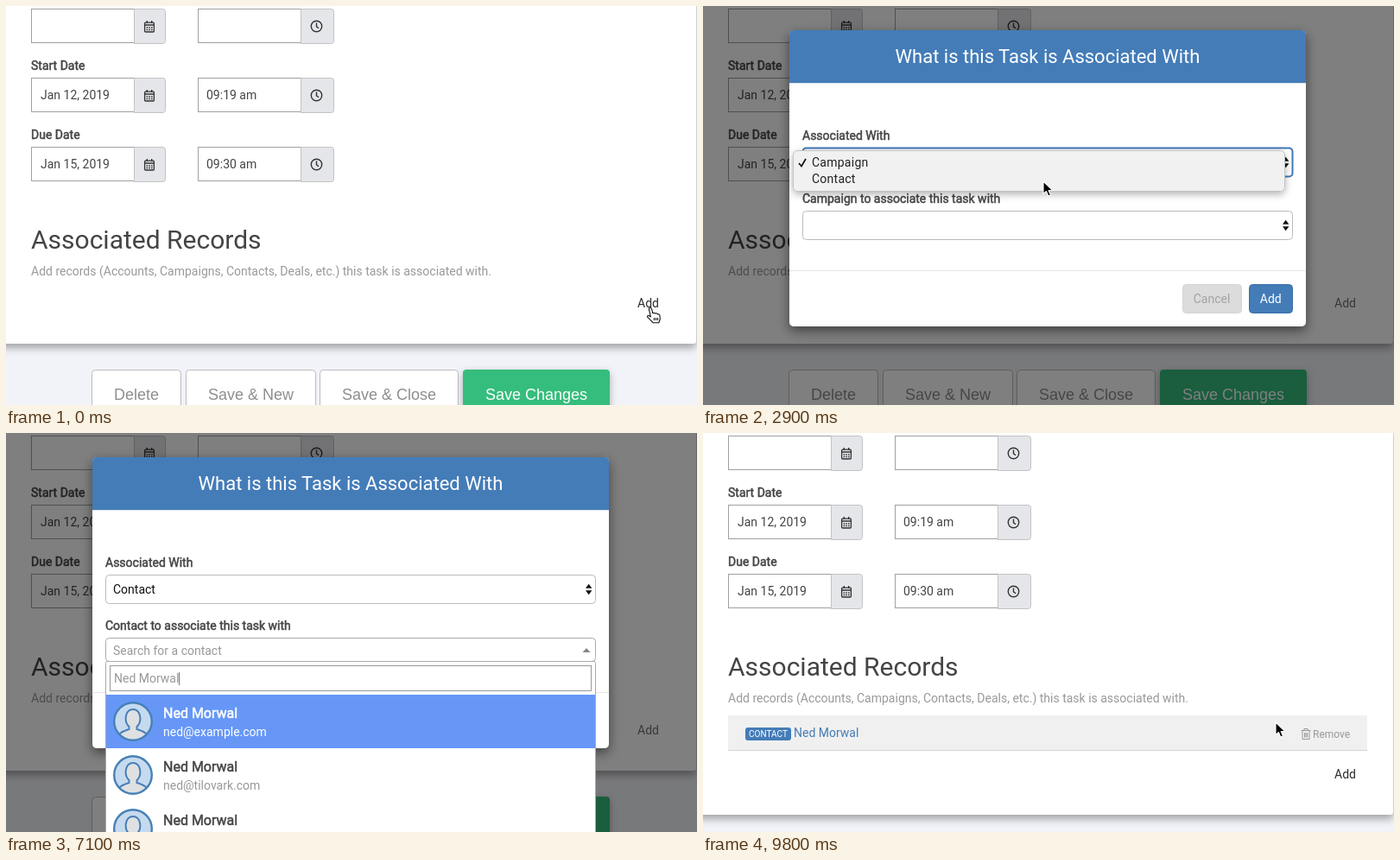
These frames come from a looping animation (800x462 px, 10 s). An HTML page:

```html
<!DOCTYPE html>
<html lang="en">
<head>
<meta charset="utf-8">
<title>Associating a task with a contact</title>
<style>
  html, body { margin: 0; width: 100%; height: 100%; overflow: hidden; background: #f2f3f8; }
  svg { display: block; width: 100%; height: 100%; }
  text { font: 14px Roboto, Arial, sans-serif; fill: #444; white-space: pre; }
  .bold { stroke: #444; stroke-width: .5px; }
  .muted { fill: #999; }
  .light { fill: #fff; }
  .mid { text-anchor: middle; }
  .action { font: 18px "Liberation Sans", Arial, sans-serif; text-anchor: middle; fill: #8e8e8e; }
</style>
</head>
<body>
<svg id="stage" viewBox="0 0 800 462">
  <defs>
    <filter id="panelShadow" x="-5%" y="-5%" width="110%" height="115%">
      <feDropShadow dx="0" dy="5" stdDeviation="5" flood-opacity=".33"/>
    </filter>
    <filter id="modalShadow" x="-10%" y="-10%" width="120%" height="125%">
      <feDropShadow dx="0" dy="5" stdDeviation="7" flood-opacity=".5"/>
    </filter>
    <filter id="softShadow" x="-10%" y="-30%" width="120%" height="170%">
      <feDropShadow dx="0" dy="3" stdDeviation="4" flood-opacity=".3"/>
    </filter>
    <clipPath id="face"><circle r="21.5"/></clipPath>
  </defs>
</svg>
<script>
const LOOP = 10000, STEP = 100;
const PERSON = "Ned Morwal";
const MAILS = ["ned@example.com", "ned@tilovark.com", "ned@example.com"];
const BLUE = "#447cb8";
const stage = document.getElementById("stage");

function el(parent, tag, attrs, content) {
  const node = document.createElementNS("http://www.w3.org/2000/svg", tag);
  for (const key in attrs) node.setAttribute(key, attrs[key]);
  if (content !== undefined) node.textContent = content;
  parent.appendChild(node);
  return node;
}
const group = (parent, attrs = {}) => el(parent, "g", attrs);
const path = (parent, d, attrs) => el(parent, "path", { d, ...attrs });
const label = (parent, x, y, content, cls = "", attrs = {}) =>
  el(parent, "text", { x, y, class: cls, ...attrs }, content);
const rect = (parent, x, y, width, height, fill, attrs = {}) =>
  el(parent, "rect", { x, y, width, height, fill, ...attrs });
// Crisp one pixel border inside the given box
const box = (parent, x, y, w, h, fill, stroke, rx = 0, attrs = {}) =>
  rect(parent, x + .5, y + .5, w - 1, h - 1, fill, { stroke, rx, ...attrs });
const show = (node, on) => node.setAttribute("visibility", on ? "inherit" : "hidden");
const within = (t, a, b) => t >= a && t < b;
const ramp = (t, start, length) => Math.min(1, Math.max(0, (t - start) / length));
const easeOut = k => 1 - (1 - k) ** 2;
const easeBoth = k => k * k * (3 - 2 * k);

// ---- page ----
const page = group(stage);
rect(page, 0, 0, 800, 462, "#f2f3f8");

const actions = group(page);
function action(x, w, content, green) {
  if (green) rect(actions, x, 421, w, 56, "#36bd7d", { rx: 4, filter: "url(#softShadow)" });
  else box(actions, x, 421, w, 56, "#fff", "#bcbcbc", 4);
  label(actions, x + w / 2, 456, content, "action", green ? { style: "fill:#fff" } : {});
}
action(99, 104, "Delete");
action(208, 151, "Save & New");
action(363, 161, "Save & Close");
action(529, 170, "Save Changes", true);

const panel = rect(page, -10, -10, 809, 401, "#fff", { rx: 4, filter: "url(#panelShadow)" });

function addon(x, y, w) {
  path(page, `M${x + .5} ${y + .5}h${w - 4}q3 0 3 3v34q0 3 -3 3h${4 - w}z`, { fill: "#e5e6ea", stroke: "#c3c3c5" });
}
function calendar(x, y) {
  const g = group(page, { transform: `translate(${x} ${y})` });
  rect(g, -5.4, -4.8, 10.8, 10.8, "none", { stroke: "#333", "stroke-width": 1.3, rx: 1 });
  path(g, "M-5.4 -2h10.8M-2.7 -7v3M2.7 -7v3", { stroke: "#333", "stroke-width": 1.4 });
  path(g, "M-3.4 .9h7M-3.4 3.4h7", { stroke: "#333", "stroke-width": 1.5, "stroke-dasharray": "1.6 1.1" });
}
function clock(x, y) {
  const g = group(page, { transform: `translate(${x} ${y})`, fill: "none", stroke: "#333", "stroke-width": 1.4 });
  el(g, "circle", { r: 6.2 });
  path(g, "M0 -4v4.3l2.6 1.9");
}
function dateRow(y, title, date, time) {
  if (title) label(page, 29, y - 9, title, "bold");
  box(page, 29, y, 120, 40, "#fff", "#a0a0a0");
  addon(148, y, 37);
  calendar(166, y + 21);
  box(page, 222, y, 120, 40, "#fff", "#a0a0a0");
  addon(341, y, 39);
  clock(359.5, y + 20.5);
  label(page, 40, y + 25, date);
  label(page, 232, y + 25, time);
}
dateRow(3, "", "", "");
dateRow(83, "Start Date", "Jan 12, 2019", "09:19 am");
dateRow(163, "Due Date", "Jan 15, 2019", "09:30 am");

label(page, 29, 281, "Associated Records", "", { style: "font-size:30px" });
label(page, 29, 312, "Add records (Accounts, Campaigns, Contacts, Deals, etc.) this task is associated with.", "muted");
const addLink = label(page, 731, 349, "Add");

const row = group(page);
rect(row, 29, 327, 740, 40, "#f0f0f0");
rect(row, 29, 367, 740, 1, "#d2d2d2");
rect(row, 49, 341, 53, 15, BLUE, { rx: 3 });
label(row, 75.5, 352.2, "CONTACT", "light mid", { style: "font-size:10px" });
label(row, 105, 352, PERSON, "", { style: `fill:${BLUE}` });
path(row, "M692.5 344.5h11M696 344v-1.5h4v1.5M694 345v9.5h8v-9.5M696.5 347v5.5M698 347v5.5M699.6 347v5.5",
  { fill: "none", stroke: "#999" });
label(row, 706, 353, "Remove", "muted", { style: "font-size:12px" });

const shade = rect(stage, 0, 0, 800, 462, "#000");

// ---- modal ----
const modal = group(stage);
const sheet = rect(modal, 100, 28, 598, 343, "#fff", { rx: 5, filter: "url(#modalShadow)" });
path(modal, "M100 89V33q0 -5 5 -5h588q5 0 5 5v56z", { fill: BLUE });
rect(modal, 100, 89, 598, 1, "#dde3ea");
label(modal, 399, 66, "What is this Task is Associated With", "light mid", { style: "font-size:22px" });

const footer = group(modal);
rect(footer, 100, 306, 598, 1, "#e5e5e5");
box(footer, 555, 322, 69, 34, "#dcdcdc", "#d4d4d4", 4);
label(footer, 589, 344, "Cancel", "mid", { style: "fill:#a3a3a3" });
const addButton = box(footer, 632, 322, 51, 34, BLUE, "#3a6fa8", 4);
label(footer, 657.3, 344, "Add", "light mid");

function stepper(parent, y) {
  path(parent, `M671 ${y - 1.2}l3.7 -5l3.7 5zM671 ${y + 1.2}l3.7 5l3.7 -5z`, { fill: "#111" });
}
label(modal, 115, 155, "Associated With", "bold");
const kindBox = box(modal, 115, 164, 568, 34, "#fff", "#bbb", 4);
const kindText = label(modal, 124, 186, "", "", { style: "fill:#111" });
stepper(modal, 181);
const targetTitle = label(modal, 115, 228, "", "bold");

const campaignPick = group(modal);
box(campaignPick, 115, 237, 568, 34, "#fff", "#bbb", 4);
stepper(campaignPick, 254);

const contactPick = group(modal);
box(contactPick, 115, 237, 568, 28, "#fff", "#aaa", 4);
const contactText = label(contactPick, 124, 257, "");
const arrow = path(contactPick, "", { fill: "#888" });

const drop = group(modal);
const dropBox = box(drop, 115, 264, 568, 72, "#fff", "#aaa", 2);
box(drop, 120, 269, 558, 30, "#fff", "#999");
const query = label(drop, 125, 289, "", "muted");
const caret = rect(drop, 0, 277, 1, 15, "#777");
const searching = label(drop, 122, 324, "Searching…", "muted");

const results = group(drop);
function contact(index) {
  const y = 303 + 62 * index, first = index === 0;
  if (first) rect(results, 116, y, 566, 62, "#6697f7");
  const face = group(results, { transform: `translate(147 ${y + 31})` });
  el(face, "circle", { r: 22, fill: "#c6daef" });
  path(face, "M-18 24C-18 13 -13 12 -4.5 9V6C-11 0 -9 -14 0 -14S11 0 4.5 6V9C13 12 18 13 18 24Z",
    { fill: "#dfe0e2", stroke: "#4780b6", "stroke-width": 2, "clip-path": "url(#face)" });
  el(face, "circle", { r: 21.8, fill: "none", stroke: "#4780b6", "stroke-width": 2.4 });
  label(results, 182, y + 27, PERSON, "bold",
    { style: "font-size:16px" + (first ? ";fill:#fff;stroke:#fff" : "") });
  label(results, 182, y + 48, MAILS[index], first ? "light" : "muted");
}
[0, 1, 2].forEach(contact);

const menu = group(modal);
box(menu, 104, 167, 570, 48, "#f1f1f1", "#c2c2c2", 5, { filter: "url(#softShadow)" });
const menuBar = rect(menu, 105, 191, 568, 19, "#3b86f7");
path(menu, "M111 182l3 3.5l5 -8.5", { fill: "none", stroke: "#111", "stroke-width": 1.7 });
const spaced = "letter-spacing:.25px;fill:";
label(menu, 126, 186, "Campaign", "", { style: spaced + "#222" });
const menuContact = label(menu, 126, 205, "Contact");

// ---- pointer ----
const ring = el(stage, "circle", { fill: "none", stroke: "#111", "stroke-width": 3 });
const pointer = group(stage);
const arrowPointer = path(pointer,
  "M0 0V14.6L3.4 11.5L5.8 17L8.4 15.9L6.1 10.6L10.6 10.3Z",
  { fill: "#000", stroke: "#fff", "stroke-width": 1.1, "stroke-linejoin": "round" });
const handPointer = path(pointer,
  "M-1.6 1.6Q-1.6 -.3 0 -.2Q1.3 0 1.7 1.8L2.8 6.2Q4.6 5.1 5.6 6.6Q7.5 5.7 8.4 7.4Q10.4 6.8 10.9 8.9L11.3 13L9.8 17.2H3Q.2 14 -3.4 10.6Q-3.6 8.6 -1.8 9L.4 10.4ZM4.4 11.5v3M6.5 11.5v3M8.5 11.5v3",
  { fill: "#fff", stroke: "#111", "stroke-width": 1.1, "stroke-linejoin": "round" });

const track = [
  [0, 746, 349.5], [100, 746, 349.5], [400, 746, 344], [1700, 746, 344], [2400, 394, 186],
  [2600, 394, 186], [2900, 394, 203], [3200, 394, 203], [3600, 394, 252], [7500, 394, 252],
  [7700, 394, 334], [7900, 394, 334], [8500, 663, 335], [LOOP, 663, 335]
];
const clicks = [600, 2500, 3100, 3700, 7800, 8600];

function pointerAt(t) {
  const i = track.findIndex(point => point[0] > t);
  const [t0, x0, y0] = track[i - 1], [t1, x1, y1] = track[i];
  const k = easeBoth(ramp(t, t0, t1 - t0));
  return [x0 + (x1 - x0) * k, y0 + (y1 - y0) * k];
}

function drawPointer(t) {
  const [x, y] = pointerAt(t);
  const hand = t < 1000 || within(t, 8400, 8900);
  pointer.setAttribute("transform", `translate(${x} ${y})`);
  show(pointer, !within(t, 4800, 7500));
  show(handPointer, hand);
  show(arrowPointer, !hand);
  const click = clicks.find(c => within(t, c, c + 300));
  show(ring, click !== undefined);
  if (click === undefined) return;
  const age = t - click;
  ring.setAttribute("cx", x + 1);
  ring.setAttribute("cy", y + 1);
  ring.setAttribute("r", 24 + age * .05);
  ring.setAttribute("opacity", age < 200 ? 1 : .5);
}

function drawPage(t) {
  const added = t >= 9000, shift = added ? 51 : 0;
  show(row, added);
  panel.setAttribute("height", 401 + shift);
  actions.setAttribute("transform", `translate(0 ${shift})`);
  addLink.setAttribute("y", 349 + shift);
  addLink.style.fill = within(t, 1200, 9000) ? "#707070" : "#2b2b2b";
  shade.setAttribute("opacity", .5 * (ramp(t, 985, 150) - ramp(t, 8950, 150)));
}

function drawModal(t) {
  const opacity = ramp(t, 1180, 150) - ramp(t, 8780, 200);
  const raise = 1 - easeOut(ramp(t, 1180, 300)) + easeOut(ramp(t, 8780, 300));
  show(modal, opacity > 0);
  modal.setAttribute("opacity", opacity);
  modal.setAttribute("transform", `translate(0 ${-90 * raise})`);

  const isContact = t >= 3200, picked = t >= 7900;
  const focused = within(t, 2500, 3700);
  sheet.setAttribute("height", isContact ? 337 : 343);
  footer.setAttribute("transform", `translate(0 ${isContact ? -6 : 0})`);
  addButton.setAttribute("fill", within(t, 8500, 8900) ? "#336394" : BLUE);
  kindText.textContent = isContact ? "Contact" : "Campaign";
  kindBox.setAttribute("stroke", focused ? "#3f78b5" : "#bbb");
  kindBox.setAttribute("stroke-width", focused ? 2 : 1);
  targetTitle.textContent = (isContact ? "Contact" : "Campaign") + " to associate this task with";
  show(campaignPick, !isContact);
  show(contactPick, isContact);
  contactText.textContent = picked ? PERSON : "Search for a contact";
  contactText.style.fill = picked ? "#666" : "#999";

  show(menu, within(t, 2700, 3200));
  const hot = t >= 3000;
  menuBar.setAttribute("opacity", hot ? 1 : 0);
  menuContact.setAttribute("style", spaced + (hot ? "#fff" : "#222"));

  const open = within(t, 3900, 7900);
  arrow.setAttribute("d", open ? "M667.5 254h9l-4.5 -5z" : "M667.5 249h9l-4.5 5z");
  show(drop, open);
  if (open) drawSearch(t);
}

function drawSearch(t) {
  const typed = t < 4800 ? 0 : t < 4900 ? 1 : t < 5200 ? 2 : 3 + Math.floor((t - 5200) / 140);
  const found = t >= 6400;
  query.textContent = PERSON.slice(0, typed);
  caret.setAttribute("x", 125 + Math.round(query.getComputedTextLength()));
  show(caret, !within(t, 4300, 4800));
  show(results, found);
  show(searching, !found);
  dropBox.setAttribute("height", found ? 260 : 71);
}

function draw(t) {
  drawPage(t);
  drawModal(t);
  drawPointer(t);
}

let start;
function tick(now) {
  start ??= now;
  draw(Math.floor(((now - start) % LOOP) / STEP) * STEP);
  requestAnimationFrame(tick);
}
draw(0);
requestAnimationFrame(tick);
</script>
</body>
</html>
```
